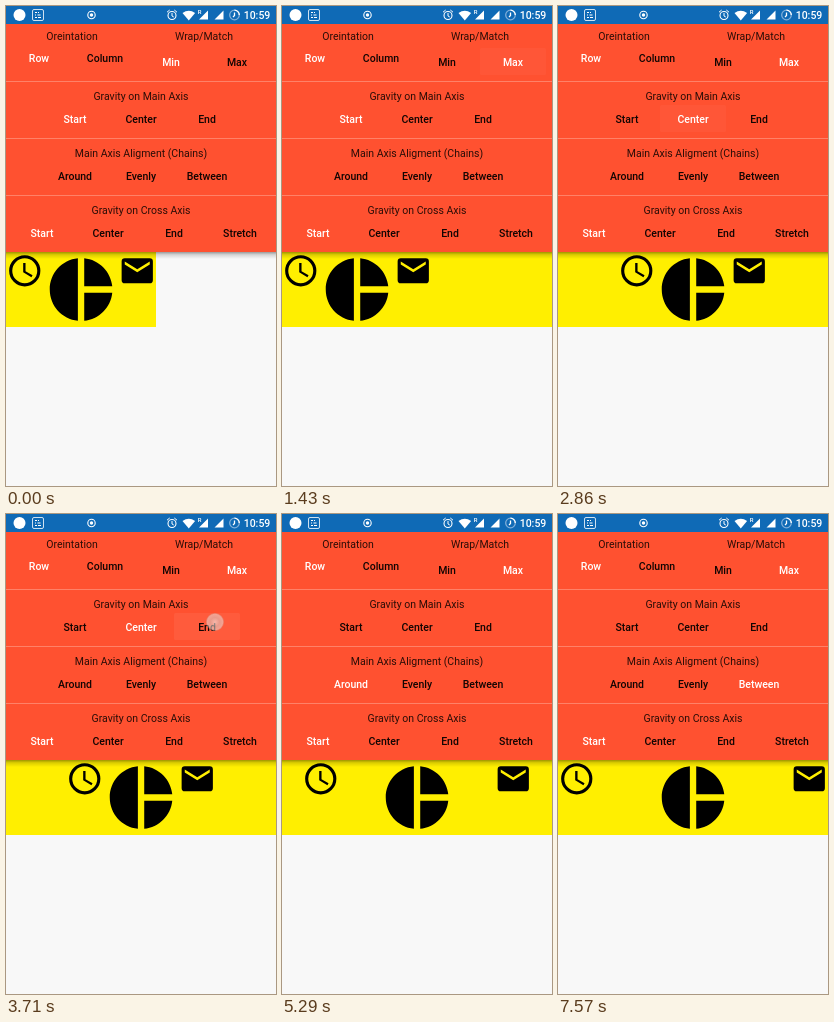
These frames come from a looping animation (270 by 480 pixels, 8000 ms). An HTML page:

```html
<!DOCTYPE html>
<html lang="en">
<head>
<meta charset="utf-8">
<title>Layout options</title>
<style>
html, body { margin: 0; width: 100%; height: 100%; overflow: hidden; background: #f8f8f8; }
svg { display: block; width: 100%; height: 100%; }
text { font: 10.5px Roboto, sans-serif; text-anchor: middle; }
.title { fill: #2b0d07; }
.option { font-weight: 500; fill: #120503; }
.option.on { fill: #fff; }
</style>
</head>
<body>
<svg viewBox="0 0 270 480">
  <defs>
    <linearGradient id="shade" x2="0" y2="1">
      <stop offset="0" stop-opacity=".38"/>
      <stop offset=".4" stop-opacity=".14"/>
      <stop offset="1" stop-opacity="0"/>
    </linearGradient>
    <radialGradient id="finger">
      <stop offset="0" stop-color="#f4ebe8" stop-opacity=".85"/>
      <stop offset=".5" stop-color="#d9cdc9" stop-opacity=".75"/>
      <stop offset=".85" stop-color="#e8dbd6" stop-opacity=".75"/>
      <stop offset="1" stop-color="#c9a095" stop-opacity=".5"/>
    </radialGradient>
  </defs>

  <rect width="270" height="480" fill="#f8f8f8"/>
  <rect id="box" y="246" height="75" fill="#ffef00"/>
  <g id="clock"><g transform="translate(0 246) scale(1.5625)">
    <circle cx="12" cy="12" r="9" fill="none" stroke="#000" stroke-width="2"/>
    <path d="M12.5 7H11v6l5.25 3.15.75-1.23-4.5-2.67z"/>
  </g></g>
  <g id="pie"><path transform="translate(37.5 246) scale(3.125)" d="M11 2v20c-5.07-.5-9-4.79-9-10s3.93-9.5 9-10zm2.03 0v8.99H22c-.47-4.74-4.24-8.52-8.97-8.99zm0 11.01V22c4.74-.47 8.5-4.25 8.97-8.99z"/></g>
  <g id="mail"><path transform="translate(112.5 246) scale(1.5625)" d="M20 4H4a2 2 0 0 0-2 2v12a2 2 0 0 0 2 2h16a2 2 0 0 0 2-2V6a2 2 0 0 0-2-2zm0 4-8 5-8-5V6l8 5 8-5z"/></g>

  <rect y="246" width="270" height="7" fill="url(#shade)"/>
  <rect y="17" width="270" height="229" fill="#ff5130"/>
  <path d="M0 75.5H270M0 132.5H270M0 189.5H270" stroke="#ff8e76" stroke-width=".8"/>
  <rect id="ripple" width="66" height="27" rx="1.5" fill="#fff" opacity="0"/>
  <g id="labels"></g>

  <rect width="270" height="18" fill="#0f6ab6"/>
  <g fill="none" stroke="#fff">
    <circle cx="13.5" cy="9" r="6" fill="#fff" stroke="none"/>
    <rect x="26.5" y="3.5" width="11" height="11" rx="1.5" stroke-width=".8"/>
    <path d="M29 6.5h2m1 0h1M29 9h1m1.5 0h3M29 11.5h2m1 0h3" stroke-width="1.2"/>
    <circle cx="85.5" cy="9" r="3.7" stroke-width="1.1"/>
    <circle cx="85.5" cy="9" r="1.7" fill="#fff" stroke="none"/>
    <circle cx="166" cy="9.5" r="4" stroke-width="1.1"/>
    <path d="M166 7v3l1.8 1M161 6.2l2.7-2.2M171 6.2l-2.7-2.2" stroke-width="1"/>
    <path d="M176.5 7q6.3-4.4 12.6 0l-6.3 7.5z" fill="#fff" stroke="none"/>
    <path d="M202 4.5v9h-9zM217.500 4.500v9h-9z" fill="#fff" stroke="none"/>
    <circle cx="228.500" cy="9" r="4.800" stroke="#7faed8" stroke-width="1.300"/>
    <path d="M228.500 4.200a4.800 4.800 0 0 1 4.800 4.800M228.500 6.500v3l-1.500 1.500" stroke-width="1.300"/>
  </g>
  <text x="193.500" y="8" fill="#fff" style="font-size:6px;font-weight:500">R</text>
  <text x="251" y="13" fill="#fff" style="font-weight:500">10:59</text>
  <circle id="touch" r="9" fill="url(#finger)" opacity="0"/>
</svg>

<script>
const LOOP = 8000;
const $ = id => document.getElementById(id);
const options = {};

function addText(className, text, x, y) {
  const node = document.createElementNS("http://www.w3.org/2000/svg", "text");
  node.setAttribute("class", className);
  node.setAttribute("x", x);
  node.setAttribute("y", y);
  node.textContent = text;
  $("labels").append(node);
  return node;
}

function addGroup(key, title, titleX, titleY, names, firstX, y) {
  addText("title", title, titleX, titleY);
  names.split(" ").forEach((name, i) => {
    const x = firstX + 66 * i;
    options[key + name] = { node: addText("option", name, x, y), x, y };
  });
}

addGroup("orient", "Oreintation", 66, 34, "Row Column", 33, 56);
addGroup("size", "Wrap/Match", 198, 34, "Min Max", 165, 59.5);
addGroup("main", "Gravity on Main Axis", 135, 94, "Start Center End", 69, 116.5);
addGroup("main", "Main Axis Aligment (Chains)", 135, 151, "Around Evenly Between", 69, 173.5);
addGroup("cross", "Gravity on Cross Axis", 135, 208, "Start Center End Stretch", 36, 230.5);

// Share of the free width placed before each icon
const layouts = {
  mainStart: [0, 0, 0],
  mainCenter: [1 / 2, 1 / 2, 1 / 2],
  mainEnd: [1, 1, 1],
  mainAround: [1 / 6, 1 / 2, 5 / 6],
  mainEvenly: [1 / 4, 1 / 2, 3 / 4],
  mainBetween: [0, 1 / 2, 1],
};

const taps = [
  { option: "sizeMax", x: 238.5, y: 59.5, down: 1140, press: 1290, change: 1430, end: 1570 },
  { option: "mainCenter", x: 143, y: 111, down: 2430, press: 2720, change: 2860, end: 3000 },
  { option: "mainEnd", x: 209, y: 108, down: 3570, press: 3710, change: 3860, end: 4000 },
  { option: "mainAround", x: 72, y: 170, down: 4860, press: 5000, change: 5150, end: 5290 },
  { option: "mainEvenly", x: 141, y: 167, down: 6000, press: 6140, change: 6290, end: 6430 },
  { option: "mainBetween", x: 207, y: 164, down: 7000, press: 7290, change: 7430, end: 7570 },
];

function draw(time) {
  let size = "sizeMin", main = "mainStart";
  for (const tap of taps) {
    if (time < tap.change) break;
    if (tap.option.startsWith("size")) size = tap.option;
    else main = tap.option;
  }

  const selected = ["orientRow", "crossStart", size, main];
  for (const key in options) options[key].node.classList.toggle("on", selected.includes(key));

  const width = size === "sizeMax" ? 270 : 150;
  $("box").setAttribute("width", width);
  ["clock", "pie", "mail"].forEach((id, i) =>
    $(id).setAttribute("transform", `translate(${(width - 150) * layouts[main][i]} 0)`));

  const tap = taps.find(t => time >= t.down && time < t.end);
  const touching = tap && time < tap.change;
  const pressed = tap && time >= tap.press;
  $("touch").setAttribute("opacity", !touching ? 0 : pressed ? 0.75 : 1);
  $("ripple").setAttribute("opacity", !pressed ? 0 : touching ? 0.06 : 0.03);
  if (tap) {
    const { x, y } = options[tap.option];
    $("touch").setAttribute("transform", `translate(${tap.x} ${tap.y})`);
    $("ripple").setAttribute("transform", `translate(${x - 33} ${y - 17.5})`);
  }
}

const start = performance.now();
function tick() {
  draw((performance.now() - start) % LOOP);
  requestAnimationFrame(tick);
}
tick();
</script>
</body>
</html>
```
